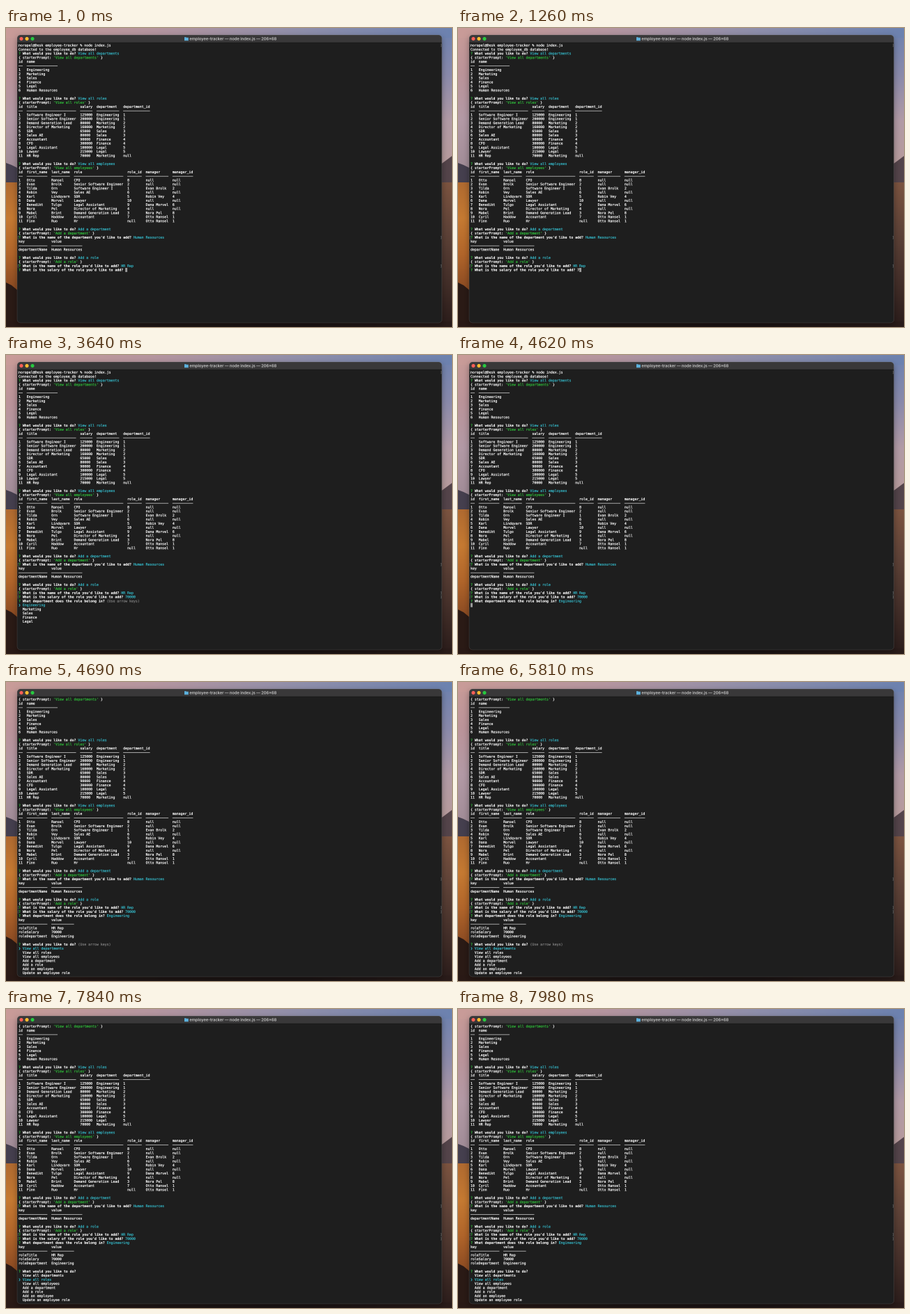
Write an HTML page with a canvas that moves like this. It is 640 px wide and 430 px high and loops after 8 s.

```html
<!DOCTYPE html>
<html lang="en">
<head>
<meta charset="utf-8">
<title>employee-tracker</title>
<style>
html, body { margin: 0; width: 100%; height: 100%; overflow: hidden; background: #1e1e1e; }
canvas { display: block; width: 640px; height: 430px; }
</style>
</head>
<body>
<canvas id="stage" width="640" height="430"></canvas>
<script>
const W = 640, H = 430, LOOP = 8000, SCALE = 4;
const CELL = 2.945, ROW = 5.873, LEFT = 18, TOP = 22, ROWS = 68;
const MONO = '"DejaVu Sans Mono", "Liberation Mono", monospace';
const SANS = 'Inter, "Open Sans", sans-serif';
const WHITE = '#ffffff', GREEN = '#2fbf3a', CYAN = '#35b9c9', DIM = '#808080';

// Times of the events, in ms
const KEYS = [1260, 1400, 1820, 1960, 2100];
const SALARY_SENT = 3080, DEPT_SENT = 4480, MENU_SHOWN = 4690, ARROW_DOWN = 7840;

const stage = document.getElementById('stage').getContext('2d');
stage.imageSmoothingQuality = 'high';
const sheet = document.createElement('canvas');
sheet.width = W * SCALE;
sheet.height = H * SCALE;
const g = sheet.getContext('2d');
g.scale(SCALE, SCALE);

// ---- Terminal lines: { spans: [text, colour, bold][], mark } ----
const line = (...spans) => ({ spans, mark: false });
const plain = text => line([text, WHITE]);
const blank = () => line();

function ask(question, answer = '', colour = CYAN, mark = false) {
  const l = line(['? ', GREEN], [question + ' ', WHITE, true], [answer, colour]);
  l.mark = mark;
  return l;
}

function table(head, rows) {
  const cells = [head, ...rows.map(r => r.split('|'))];
  const widths = head.map((_, i) => Math.max(...cells.map(r => r[i].length)));
  const join = r => plain(r.map((c, i) => c.padEnd(widths[i])).join('  '));
  return [join(head), join(widths.map(n => '–'.repeat(n))), ...cells.slice(1).map(join)];
}

const numbered = rows => rows.map((r, i) => i + 1 + '|' + r);

const START = 'What would you like to do?';
const choose = option => [
  ask(START, option),
  line(['{ starterPrompt: ', WHITE], [`'${option}'`, GREEN], [' }', WHITE])
];

const menu = (options, picked) => options.map((o, i) =>
  i === picked ? line(['❯ ' + o, CYAN]) : plain('  ' + o));

const DEPTS = ['Engineering', 'Marketing', 'Sales', 'Finance', 'Legal'];
const ACTIONS = ['View all departments', 'View all roles', 'View all employees',
  'Add a department', 'Add a role', 'Add an employee', 'Update an employee role'];

const shellLine = plain('norapel@Desk employee-tracker % node index.js');
shellLine.mark = true;

const history = [
  shellLine,
  plain('Connected to the employee_db database!'),
  ...choose(ACTIONS[0]),
  ...table(['id', 'name'], numbered([...DEPTS, 'Human Resources'])),
  blank(),
  ...choose(ACTIONS[1]),
  ...table(['id', 'title', 'salary', 'department', 'department_id'], numbered([
    'Software Engineer I|125000|Engineering|1',
    'Senior Software Engineer|200000|Engineering|1',
    'Demand Generation Lead|80000|Marketing|2',
    'Director of Marketing|160000|Marketing|2',
    'SDR|65000|Sales|3',
    'Sales AE|80000|Sales|3',
    'Accountant|90000|Finance|4',
    'CFO|300000|Finance|4',
    'Legal Assistant|100000|Legal|5',
    'Lawyer|215000|Legal|5',
    'HR Rep|70000|Marketing|null'
  ])),
  blank(),
  ...choose(ACTIONS[2]),
  ...table(['id', 'first_name', 'last_name', 'role', 'role_id', 'manager', 'manager_id'], numbered([
    'Otto|Ransel|CFO|8|null|null',
    'Evan|Brolk|Senior Software Engineer|2|null|null',
    'Tilda|Orn|Software Engineer I|1|Evan Brolk|2',
    'Robin|Vey|Sales AE|6|null|null',
    'Karl|Lindqvarn|SDR|5|Robin Vey|4',
    'Dana|Morvel|Lawyer|10|null|null',
    'Benedikt|Tulgo|Legal Assistant|9|Dana Morvel|6',
    'Nora|Pel|Director of Marketing|4|null|null',
    'Mabel|Brint|Demand Generation Lead|3|Nora Pel|8',
    'Cyril|Haddow|Accountant|7|Otto Ransel|1',
    'Finn|Ruo|Hr|null|Otto Ransel|1'
  ])),
  blank(),
  ...choose(ACTIONS[3]),
  ask("What is the name of the department you'd like to add?", 'Human Resources', CYAN, true),
  ...table(['key', 'value'], ['departmentName|Human Resources']),
  blank(),
  ...choose(ACTIONS[4]),
  ask("What is the name of the role you'd like to add?", 'HR Rep', CYAN, true)
];

const HINT = '(Use arrow keys)';
const SALARY_Q = "What is the salary of the role you'd like to add?";
const DEPT_Q = 'What department does the role belong in?';

function screenAt(t) {
  const lines = [...history];
  if (t < SALARY_SENT) {
    const typed = '70000'.slice(0, KEYS.filter(k => t >= k).length);
    lines.push(ask(SALARY_Q, typed, WHITE));
    return { lines, cursor: [SALARY_Q.length + 3 + typed.length, lines.length - 1] };
  }
  lines.push(ask(SALARY_Q, '70000', CYAN, true));
  if (t < DEPT_SENT) {
    lines.push(ask(DEPT_Q, HINT, DIM), ...menu(DEPTS, 0));
    return { lines };
  }
  lines.push(ask(DEPT_Q, DEPTS[0]));
  if (t < MENU_SHOWN) return { lines, cursor: [0, lines.length] };

  const moved = t >= ARROW_DOWN;
  lines.push(
    ...table(['key', 'value'], ['roleTitle|HR Rep', 'roleSalary|70000', 'roleDepartment|Engineering']),
    blank(),
    ask(START, moved ? '' : HINT, DIM),
    ...menu(ACTIONS, moved ? 1 : 0)
  );
  return { lines: lines.slice(-ROWS) };
}

// ---- Drawing ----
function fade(x, y, w, h, dx, dy, colours) {
  const f = g.createLinearGradient(x, y, x + dx, y + dy);
  colours.forEach((c, i) => f.addColorStop(i / (colours.length - 1), c));
  g.fillStyle = f;
  g.fillRect(x, y, w, h);
}

function shape(colour, points) {
  g.fillStyle = colour;
  g.beginPath();
  points.forEach(p => g.lineTo(...p));
  g.fill();
}

function dot(x, y, r, colour) {
  g.fillStyle = colour;
  g.beginPath();
  g.arc(x, y, r, 0, Math.PI * 2);
  g.fill();
}

// Sky, far ridge, dunes and the dark foreground around the window
function wallpaper() {
  fade(0, 0, 320, H, 0, 200, ['#c99c98', '#bb949a', '#b39aa6', '#a28d98']);
  fade(320, 0, 320, H, 0, 200, ['#6c82b0', '#8a8aab', '#b29ba6', '#b89c9c']);
  fade(0, 0, W, 14, W, 0, ['#c99c98', '#b596a0', '#8f8fab', '#6c82b0']);
  shape('#453f4e', [[0, 194], [8, 197], [20, 203], [20, 240], [0, 240]]);
  fade(0, 222, 20, 208, 0, 208, ['#b06a30', '#c67a32', '#b1652a', '#8a4a22', '#3a2218']);
  shape('#2a1a15', [[0, 366], [8, 370], [20, 380], [20, 430], [0, 430]]);
  shape('#54444a', [[640, 184], [632, 190], [620, 199], [620, 240], [640, 240]]);
  fade(620, 222, 20, 208, 0, 208, ['#7c5440', '#5f4338', '#45302a', '#2a1c1a']);
  fade(0, 422, W, 8, W, 0, ['#2a1a15', '#1f1615', '#1c1414', '#2a1c1a']);
}

function frame() {
  g.save();
  g.shadowColor = 'rgba(0,0,0,.35)';
  g.shadowBlur = 9 * SCALE;
  g.shadowOffsetY = 3 * SCALE;
  g.fillStyle = '#1e1e1e';
  g.beginPath();
  g.roundRect(16, 10, 609.5, 414, 5);
  g.fill();
  g.restore();

  g.save();
  g.clip();
  g.fillStyle = '#393839';
  g.fillRect(16, 10, 610, 11);
  g.fillStyle = '#111';
  g.fillRect(16, 20.8, 610, 0.4);
  g.restore();
  g.strokeStyle = 'rgba(150,150,150,.35)';
  g.lineWidth = 0.5;
  g.stroke();

  ['#fb5f57', '#fdbc2e', '#28c840'].forEach((c, i) => dot(22 + i * 8, 15.5, 2.6, c));

  g.fillStyle = '#5cb0dc';
  g.fillRect(256, 13.2, 2.6, 1.2);
  g.fillRect(256, 13.8, 5.8, 4.4);
  g.fillStyle = '#c9c9c9';
  g.font = `600 5.7px ${SANS}`;
  g.fillText('employee-tracker — node index.js — 206×68', 263.4, 17.6);
}

function terminal({ lines, cursor }) {
  if (cursor) {
    g.fillStyle = '#9a9a9a';
    g.fillRect(LEFT + cursor[0] * CELL, TOP + cursor[1] * ROW, CELL, ROW);
  }
  lines.forEach(({ spans, mark }, row) => {
    const y = TOP + row * ROW + 4.6;
    let col = 0;
    for (const [text, colour, bold] of spans) {
      g.fillStyle = g.strokeStyle = colour;
      g.font = `${bold ? 'bold ' : ''}4.9px ${MONO}`;
      // a thin outline gives the medium weight of the terminal face
      g.lineWidth = bold ? 0.1 : 0.22;
      for (const ch of text) {
        if (ch !== ' ') {
          const x = LEFT + col * CELL;
          g.fillText(ch, x, y);
          g.strokeText(ch, x, y);
        }
        col++;
      }
    }
    if (mark) {
      g.fillStyle = '#8a8a8a';
      g.font = `4.9px ${MONO}`;
      g.fillText('[', 15.8, y);
      g.fillText(']', 622.8, y);
    }
  });
}

const EVENTS = [...KEYS, SALARY_SENT, DEPT_SENT, MENU_SHOWN, ARROW_DOWN];
let shown = -1;

function tick() {
  const t = performance.now() % LOOP;
  const step = EVENTS.filter(e => t >= e).length;
  if (step !== shown) {
    shown = step;
    wallpaper();
    frame();
    terminal(screenAt(t));
    stage.drawImage(sheet, 0, 0, W, H);
  }
  requestAnimationFrame(tick);
}
tick();
</script>
</body>
</html>
```
